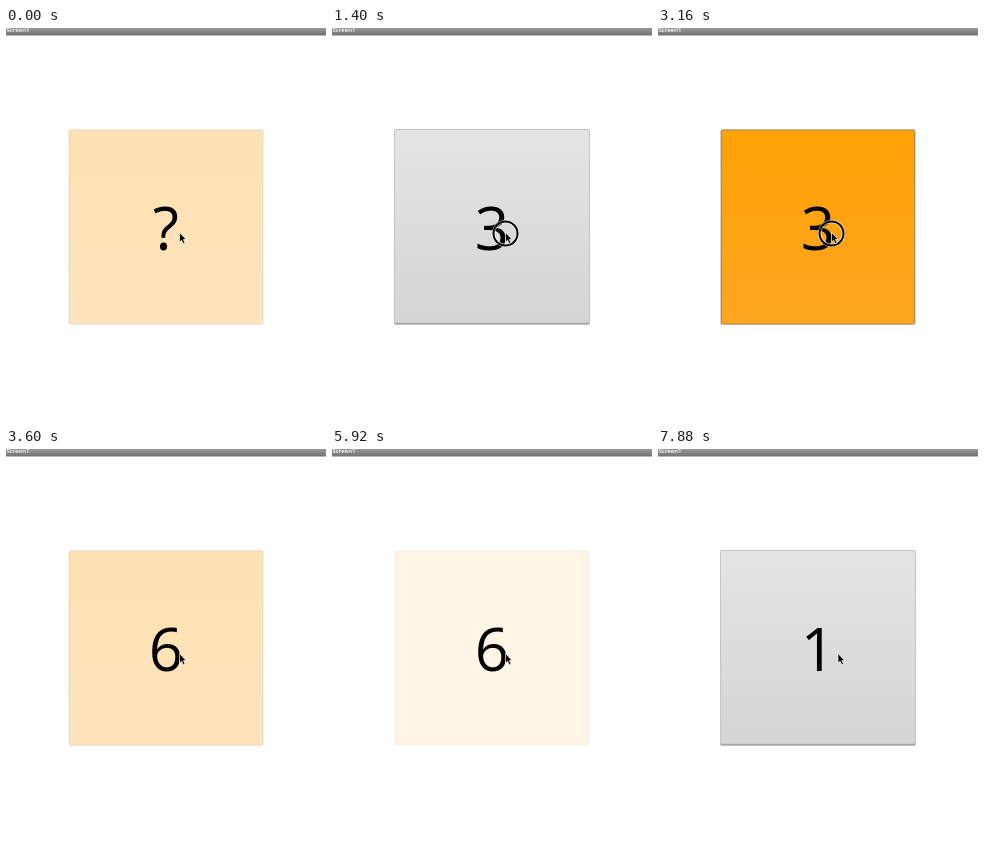
An HTML page that plays this animation: 320x393 px, repeating every 8 s.

```html
<!DOCTYPE html>
<html lang="en">
<head>
<meta charset="utf-8">
<title>Dice button</title>
<style>
html, body { margin: 0; width: 100%; height: 100%; overflow: hidden; background: #fff; }
svg { display: block; width: 320px; height: 393px; }
text { font-family: "Open Sans", "Noto Sans", sans-serif; }
</style>
</head>
<body>
<svg viewBox="0 0 320 393">
  <defs>
    <linearGradient id="bar" x2="0" y2="1"><stop stop-color="#999"/><stop offset="1" stop-color="#707070"/></linearGradient>
    <linearGradient id="grey" x2="0" y2="1"><stop stop-color="#e4e4e4"/><stop offset="1" stop-color="#d5d5d5"/></linearGradient>
    <linearGradient id="orange" x2="0" y2="1"><stop stop-color="#ffa205"/><stop offset="1" stop-color="#ffa521"/></linearGradient>
  </defs>
  <rect width="320" height="7.5" fill="url(#bar)"/>
  <text x="0.5" y="4.4" font-size="6" font-weight="600" fill="#fff">Screen1</text>

  <g id="idle">
    <rect x="62" y="101" width="196" height="196" rx="2" fill="#ddd"/>
    <rect x="62.5" y="101.5" width="195" height="195" rx="1.5" fill="url(#grey)" stroke="#c4c4c4"/>
    <path d="M63 295.5H257" stroke="#a9a9a9" stroke-width="1.5"/>
  </g>
  <g id="pressed">
    <rect x="62.5" y="101.5" width="195" height="195" rx="1.5" fill="none" stroke="#d6d3ce"/>
    <rect x="63.5" y="102" width="193" height="194" rx="1" fill="url(#orange)" stroke="#b08f55"/>
  </g>
  <text id="face" x="160" y="222" font-size="60" text-anchor="middle"></text>

  <g id="mouse">
    <g id="ring" fill="none">
      <circle r="12" stroke="#fff" stroke-width="3.2" stroke-opacity=".8"/>
      <circle r="12" stroke="#000" stroke-width="2"/>
    </g>
    <path d="M0-1V8.6L2.1 6.7 3.8 10.3 5.5 9.5 3.9 6H6.6Z" stroke="#fff" stroke-width=".8" stroke-opacity=".85"/>
  </g>
</svg>
<script>
const LOOP = 8000, FADE = 400;
const faces = [[0, "?"], [600, "3"], [3520, "6"], [6640, "1"]];
const presses = [[-80, 600], [1680, 3520], [3520, 4240], [5920, 6640]];
const clicks = [[1400, 1680], [3160, 3520], [5600, 5920], [7600, 7880]];

const el = id => document.getElementById(id);
const clamp = v => Math.min(1, Math.max(0, v));
const show = (id, on) => el(id).setAttribute("visibility", on ? "visible" : "hidden");
const active = (spans, t) => spans.find(([from, to]) => t >= from && t < to);

function draw(now) {
  const t = now % LOOP;
  const press = active(presses, t);
  show("idle", !press);
  show("pressed", press);
  if (press) el("pressed").setAttribute("opacity", clamp((t - press[0] + 40) / FADE));

  el("face").textContent = faces.findLast(([from]) => t >= from)[1];

  show("ring", active(clicks, t));
  const x = 173.5 + 6.5 * clamp((t - 7240) / 360);
  el("mouse").setAttribute("transform", `translate(${x} 205.5)`);
  requestAnimationFrame(() => draw(performance.now() - start));
}

const start = performance.now();
draw(0);
</script>
</body>
</html>
```
